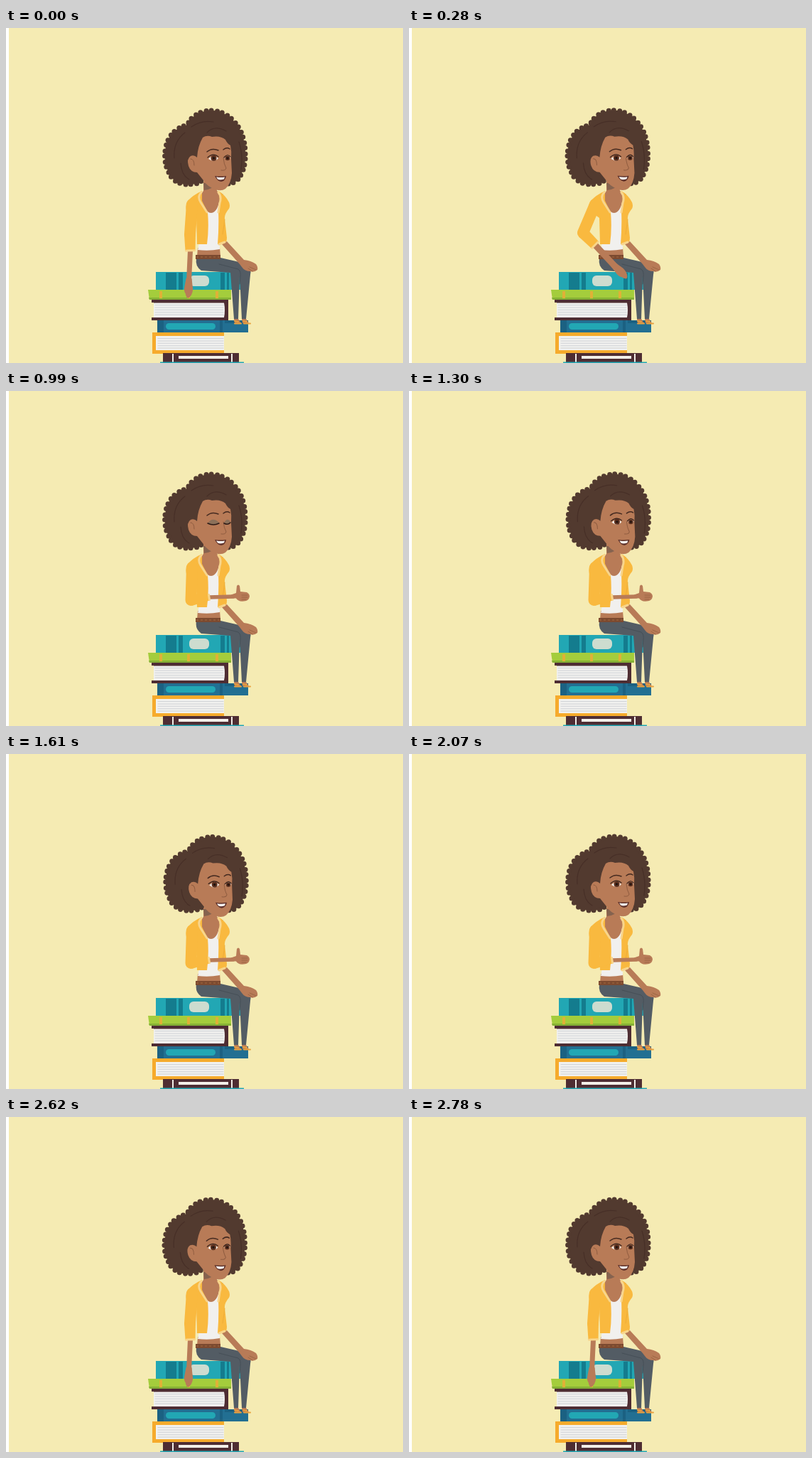
An HTML page that plays this animation: 559 px wide and 471 px high, repeating every 2950 ms.

```html
<!DOCTYPE html>
<html lang="en">
<head>
<meta charset="utf-8">
<title>Reader on a stack of books</title>
<style>
  html, body { margin: 0; width: 100%; height: 100%; overflow: hidden; background: #fff; }
  svg { display: block; width: 559px; height: 471px; }
  .line { fill: none; stroke-linecap: round; stroke-linejoin: round; }
  .skin { fill: #b87b57; }
  .skinLine { stroke: #b87b57; }
  .coat { fill: #f9b93f; }
  .coatLine { stroke: #f9b93f; }
  .teal { fill: #22a7b4; }
  .navy { fill: #147c8e; }
  .wine { fill: #4e2d33; }
  .denim { fill: #535c64; }
  .page { fill: #f1f1ef; }
</style>
</head>
<body>
<svg viewBox="0 0 559 471">
  <rect x="4" width="555" height="471" fill="#f5ebb3"/>

  <g id="books">
    <path class="teal" d="M211 343h121v25H211z"/>
    <path class="navy" d="M225 344h15v24h-15zM243 344h6v24h-6zM302 344h6v24h-6zM311 344h3v24h-3z"/>
    <rect x="258" y="348" width="28" height="15" rx="6" fill="#cddccf"/>
    <path fill="#a4cd3c" d="M200 368h117v14H202z"/>
    <path fill="#86b135" d="M201 379h116v3H202z"/>
    <path fill="#e0b136" d="M216 370h4v10h-4zM255 370h4v10h-4zM295 370h4v10h-4z"/>

    <path class="wine" d="M205 382h108v29H205v-4h3v-21h-3z"/>
    <path class="page" d="M208 386.500h99q2 10 0 20.500H208z"/>
    <path d="M258 389v17" stroke="#cfd2d6" stroke-width="97" stroke-dasharray="1 2.4"/>

    <path fill="#226f92" d="M213 411h128v17H213z"/>
    <path fill="#1b6182" d="M213 411h9v17h-9zM301 411h4v17h-4zM308 411h33v4h-33z"/>
    <rect x="225" y="415" width="70" height="9" rx="4.5" class="teal"/>

    <path fill="#f6ab2c" d="M206 428h101v5h-96v20h96v5H206z"/>
    <path class="page" d="M211 433h96v20H211z"/>
    <path d="M260 436v16" stroke="#cfd2d6" stroke-width="93" stroke-dasharray="1 2.4"/>

    <path class="wine" d="M221 457h107v13H221z"/>
    <path fill="#f3efe9" d="M243 461h70v4h-70zM234 458h2v12h-2zM317 458h2v12h-2z"/>
    <path class="teal" d="M217 469.5h118v2H217z"/>
  </g>

  <g class="head">
    <path id="hair" fill="#523a2f" stroke="#523a2f" stroke-width="7" stroke-linecap="round" stroke-dasharray="0 7 0 8.5"
      d="M257 133C262 123 275 116 289 116C303 116 317 124 325 136C333 146 337 161 337 176C338 192 333 206 325 215C319 219 312 220 304 218L276 214C273 219 264 220 254 220C244 220 233 214 229 203C223 192 222 177 226 163C231 148 241 139 257 136Z"/>
    <path class="line" stroke="#472f27" stroke-width="1.2" d="M252 147q-17 13-15 36M261 139q14-10 31-7M246 190q1 17 12 23M328 160q6 18 3 39M283 147q11-11 27-2"/>
  </g>

  <g id="body">
    <path class="skin" d="M278 216h18l1 13 9 5-6 28h-16l-12-25 6-8z"/>
    <path fill="#85634f" d="M278 218h16q-2 9-15 10z"/>
    <path class="skin" d="M270 309h31l1 12h-33z"/>
    <path fill="#f1f0ee" d="M276 244q5 16 13 16 8-1 11-15l1 66q-15 3-31 1l4-20z"/>
    <path class="coat" d="M276 229q-13 6-20 14-4 5-2 14l14 10 1 37 14 0q3-22 1-45l-8-16z"/>
    <path class="coat" d="M299 229q10 6 15 16 2 5 0 9-7 8-6 15l3 26q0 8-6 9l-7 0q2-25 1-47l2-16z"/>
    <path class="line" stroke="#f8d58c" stroke-width="3" d="M275 231q-6 6-1 14l9 14M299 231q5 6 2 15l-2 13"/>
    <path class="line" stroke="#eba937" stroke-width=".8" d="M308 269l-3 21"/>

    <path class="denim" d="M266 324l36-1 22 5 17 5q5 5 3 14l-6 62h-6l-3-60-2 60h-6l-5-65-41-3q-9-6-7-17z"/>
    <path class="line" stroke="#464f57" stroke-width="1" d="M300 332l27 7q4 3 3 11l-1 10"/>
    <path fill="#7c4a30" d="M267 319h35v6h-35z"/>
    <path stroke="#a2683c" stroke-width="1" stroke-dasharray="3 3" d="M268 322h34"/>
    <path class="skin" d="M321 409h6l4 6h-9zM332 409h6l4 6h-9z"/>
    <path class="line" stroke="#e9a23f" stroke-width="2" d="M322 415.500h9M322 412l5 1M335 415.500h9M334 412l5 1"/>

    <path class="skin" d="M304 304l7-4 24 26q10 1 17 6 3 4 2 8-5 4-10 2-8 0-12-6l-3-4z"/>
    <path class="line" stroke="#95613f" stroke-width=".8" d="M343 336l9 4M341 338l6 4"/>
    <path class="line" stroke="#f8d58c" stroke-width="3" d="M300 304l8-3"/>
  </g>

  <g class="head">
    <path class="skin" d="M277 154q6-4 13-1 12-2 19 4 2 5 7 8 2 9 1 19l1 20q-1 15-9 22-6 4-14 1-12-4-18-14l-8-10q-9 0-12-9-3-10 3-14 5-2 9 2 1-16 8-28z"/>
    <path class="line" stroke="#8f5c40" stroke-width="1" d="M260 184q5 0 5 9M306 183q1 9 4 14-1 4-7 3"/>
    <path class="line" stroke="#442a20" stroke-width="1.500" d="M283 174q7-6 16-2M306 171q5-4 9-1"/>
    <g id="open">
      <path fill="#f4efe9" d="M285 184q7-7 14-1-6 7-14 1zM308 183q4-6 8-1-2 7-8 1z"/>
      <circle cx="292.500" cy="183" r="4" fill="#5b301f"/>
      <circle cx="312" cy="183" r="3.300" fill="#5b301f"/>
      <circle cx="292.500" cy="183" r="1.700" fill="#20120e"/>
      <circle cx="312" cy="183" r="1.500" fill="#20120e"/>
      <path class="line" stroke="#35211a" stroke-width="1.200" d="M284 182q8-7 15-1M307 182q5-6 9-1"/>
    </g>
    <g id="shut">
      <path fill="#8b7059" d="M284 185q7-10 16-1-6 5-16 1zM307 184q5-8 9-1-2 5-9 1z"/>
      <path class="line" stroke="#2b1a16" stroke-width="1.500" d="M284 185q8 4 16 0M307 185q5 3 9-1"/>
    </g>
    <path fill="#5c2f28" d="M294 208q8 1 16 0-1 7-7 8-6-1-9-8z"/>
    <path fill="#f6f3f0" d="M296 209.500q7 1 12 0l-1 3q-6 2-9 0z"/>
  </g>

  <g id="arm">
    <path id="fore" class="line skinLine"/>
    <g id="hand">
      <path id="rest" class="skin" d="M-4-4q9-1 14-2 7 0 11 3 4 3 2 5-3 2-5 2-4 3-9 2-7-1-13-2z"/>
      <g id="thumb">
        <path class="skin" d="M-3-2.500L4-5 5-15q2-3 4 0l1 8 9 1q4 2 4 6-1 6-8 6.500-8 1-11-4l-7-.5z"/>
        <path class="line" stroke="#95613f" stroke-width=".8" d="M12-2h8M12 1h8M12 4h6"/>
      </g>
    </g>
    <path id="upper" class="line coatLine" stroke-width="16"/>
    <path id="lower" class="coat"/>
    <path id="cuff" class="line" stroke="#f8d58c" stroke-width="3"/>
  </g>
</svg>
<script>
  const LOOP = 2950;
  const ticks = [0, 130, 200, 280, 450, 520, 600, 690, 840, 910, 990, 1080, 1240, 1310, 1390,
    1530, 1610, 1700, 1770, 1930, 2000, 2070, 2230, 2310, 2390, 2540, 2620, 2700, 2780];

  // elbow x,y, cuff x,y, wrist x,y, hand angle, cuff half width, wrist width
  const down = [259, 290, 259.5, 313, 257.5, 356, 92, 7, 7];
  const bent = [245, 288, 262, 305, 290, 335, 44, 7, 9];
  const up = [260.5, 294, 286, 290, 320, 289, 0, 4.5, 5.5];
  const armKeys = [[0, down], [130, down], [280, bent], [450, up], [2200, up], [2390, bent], [2620, down], [LOOP, down]];
  // head shift x,y and tilt
  const headKeys = [[0, [0, 0, 0]], [600, [-1, -.5, -.4]], [990, [0, 1, 0]], [1610, [.8, .6, .5]],
    [2070, [0, 0, 0]], [2390, [-1.3, .6, -.5]], [2780, [0, 0, 0]], [LOOP, [0, 0, 0]]];

  const $ = id => document.getElementById(id);
  const heads = document.querySelectorAll('.head');
  const show = (id, on) => $(id).setAttribute('visibility', on ? 'visible' : 'hidden');
  const draw = (id, d) => $(id).setAttribute('d', d);

  function pose(keys, t) {
    const i = keys.findIndex(k => k[0] > t);
    const [t0, a] = keys[i - 1], [t1, b] = keys[i];
    const u = (t - t0) / (t1 - t0), s = u * u * (3 - 2 * u);
    return a.map((v, j) => v + (b[j] - v) * s);
  }

  function moveArm(t) {
    const [ex, ey, cx, cy, wx, wy, angle, half, width] = pose(armKeys, t);
    const len = Math.hypot(cx - ex, cy - ey);
    const nx = (ey - cy) / len, ny = (cx - ex) / len;
    const side = (x, y, r) => `${x + nx * r} ${y + ny * r}`;
    draw('upper', `M262 248L${ex} ${ey}`);
    draw('lower', `M${side(ex, ey, 8)}L${side(cx, cy, half)} ${side(cx, cy, -half)} ${side(ex, ey, -8)}Z`);
    draw('cuff', `M${side(cx, cy, half - 1)}L${side(cx, cy, 1 - half)}`);
    draw('fore', `M${cx} ${cy}L${wx} ${wy}`);
    $('fore').setAttribute('stroke-width', width);
    $('hand').setAttribute('transform', `translate(${wx} ${wy}) rotate(${angle})`);
    const raised = t >= 400 && t < 2300;
    show('thumb', raised);
    show('rest', !raised);
  }

  function render(t) {
    const [x, y, tilt] = pose(headKeys, t);
    heads.forEach(h => h.setAttribute('transform', `translate(${x} ${y}) rotate(${tilt} 288 225)`));
    const blink = t >= 910 && t < 1080;
    show('shut', blink);
    show('open', !blink);
    moveArm(t);
  }

  const start = performance.now();
  function frame() {
    const now = (performance.now() - start) % LOOP;
    render(ticks.filter(t => t <= now).pop());
    requestAnimationFrame(frame);
  }
  frame();
</script>
</body>
</html>
```
